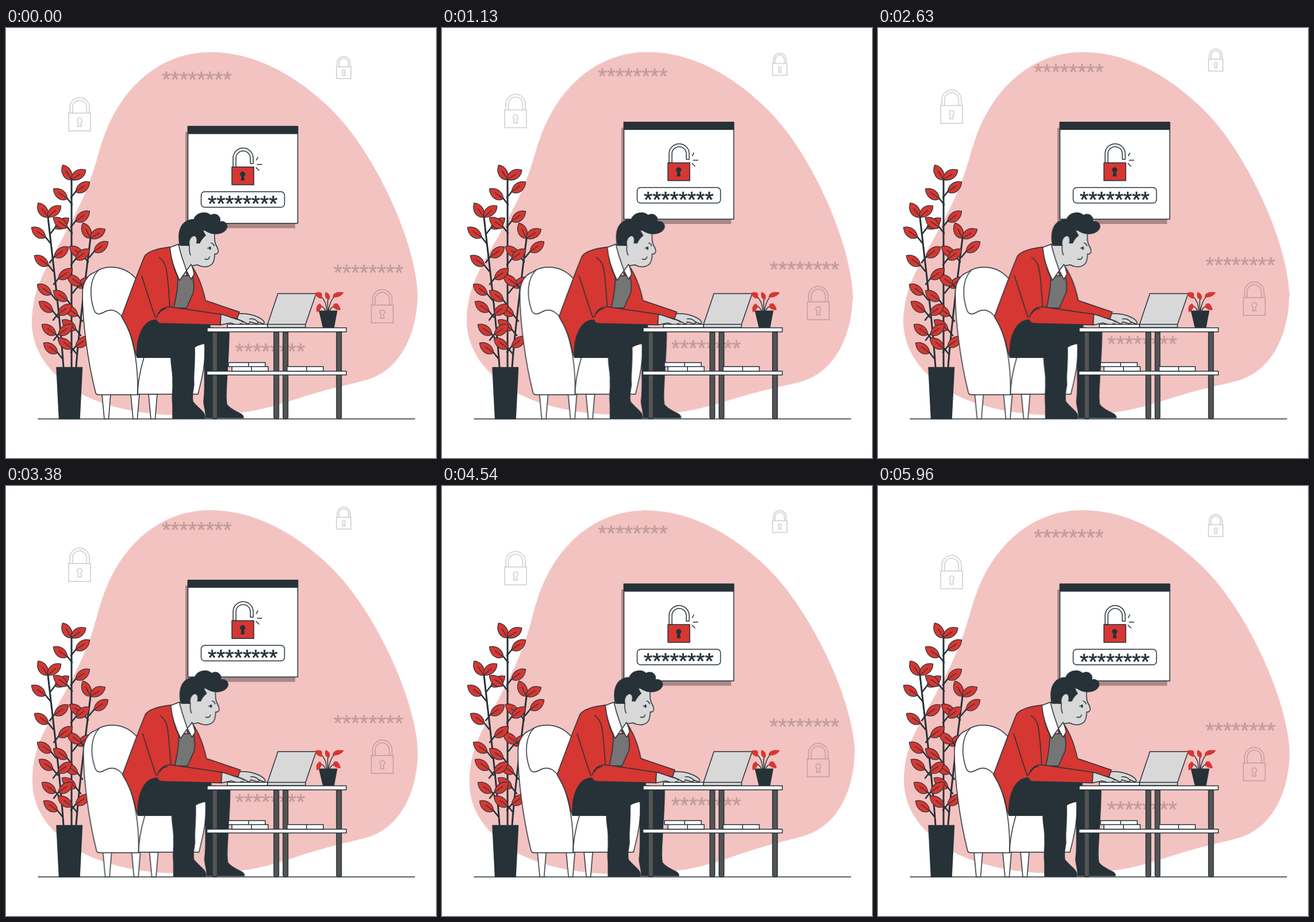
These frames come from a looping animation (748 by 748 pixels, 6 s). An HTML page without scripts:

```html
<!DOCTYPE html>
<html lang="en">
<head>
<meta charset="utf-8">
<title>Password desk</title>
<style>
html, body { margin: 0; width: 100%; height: 100%; overflow: hidden; background: #fff; }
svg { display: block; width: 100vw; height: 100vh; }

.ink { stroke: #263238; stroke-width: 1.5; stroke-linecap: round; stroke-linejoin: round; }
.dark { fill: #263238; }
.red { fill: #d63732; }
.white { fill: #fff; }
.skin { fill: #d8d8d8; }
.line { fill: none; }
.faint { opacity: .2; }
.stars { font: 39px "Liberation Sans", Arial, sans-serif; text-anchor: middle; stroke: #000; stroke-width: .6; }
.stars.dark { stroke: #263238; }
.lock { fill: none; stroke: #000; stroke-width: 1.5; }
#lock path, #key { vector-effect: non-scaling-stroke; }

.blob { fill: #f3c3c1; transform-box: fill-box; transform-origin: center; animation: sway 6s linear infinite; }
.drift { animation: rise 6s linear infinite; }
.card { animation: rise 1.5s linear infinite; }
.man { animation: shake 6s linear infinite; }

@keyframes sway {
  25% { transform: rotate(1deg); }
  75% { transform: rotate(-1deg); }
}
@keyframes rise {
  50% { transform: translateY(-15px); }
}
@keyframes shake {
  10%, 90% { transform: translateX(-1.5px); }
  20%, 80% { transform: translateX(3px); }
  30%, 50%, 70% { transform: translateX(-6px); }
  40%, 60% { transform: translateX(6px); }
}
</style>
</head>
<body>
<svg viewBox="0 0 748 748">
<defs>
  <path id="key" d="M-2 16.300A4.200 4.200 0 1 1 2 16.300L3.200 23H-3.200Z"/>
  <g id="lock">
    <path d="M-19 0H19V31H-19Z"/>
    <path d="M-17 0V-10A17 17 0 0 1 17-10V0M-12.300 0V-10A12.300 12.300 0 0 1 12.300-10V0"/>
    <use href="#key"/>
  </g>
  <g id="leaf" stroke-width="1.200">
    <path class="red" d="M0 0C5-10 20-12 30 1C22 10 8 10 0 0Z"/>
    <path class="line" d="M0 0L18 .5"/>
  </g>
  <g id="l">
    <path class="line" stroke-width="2.600" d="M0 0L8 10"/>
    <use href="#leaf" transform="rotate(-147)"/>
  </g>
  <use id="r" href="#l" transform="scale(-1 1)"/>
  <path id="leg" class="ink" fill="#545454" d="M0 529H8.500V677Q8.500 680 4.300 680Q0 680 0 677Z"/>
  <path id="foot" class="ink white" d="M0 637L4 680H11.500L15 637Z"/>
</defs>

<path class="blob" d="M357 42C265 42 208 105 180 165C168 191 163 212 154 242C135 306 100 360 70 418C50 455 45 485 45 515C46 565 80 607 130 636C190 668 270 676 330 673C410 674 450 663 500 647C550 630 590 622 625 613C690 595 716 525 716 462C713 380 653 240 583 160C522 92 440 42 357 42Z"/>

<g class="drift">
  <g class="faint">
    <g class="lock">
      <use href="#lock" x="128" y="148"/>
      <use href="#lock" x="654.500" y="482"/>
      <use href="#lock" transform="translate(587.500 67.500) scale(.66)"/>
    </g>
    <g class="stars">
      <text x="332" y="102.500">********</text>
      <text x="630.500" y="438.500">********</text>
      <text x="459.500" y="576">********</text>
    </g>
  </g>
</g>

<g class="card">
  <g transform="translate(0 .8)">
    <path opacity=".3" d="M312 180H503V347.500H312Z"/>
    <path class="ink white" d="M316.500 170.500H507.500V339H316.500Z"/>
    <path class="ink dark" d="M316.500 170.500H507.500V183H316.500Z"/>
    <path class="ink white" d="M395 241V225.500A17.500 17.500 0 0 1 430 225.500V235H425V225.500A12.500 12.500 0 0 0 400 225.500V241Z"/>
    <path class="ink red" d="M393 241H431V272H393Z"/>
    <use href="#key" class="dark" transform="translate(411.700 239.500) scale(1.100)"/>
    <path class="ink line" d="M435.500 229L438 224M437 236.700H445M435 242L440 247"/>
    <rect class="ink white" x="339.500" y="284" width="145" height="27" rx="6"/>
    <text class="stars dark" x="411.700" y="318.500">********</text>
  </g>
</g>

<path class="ink" d="M56 680H711"/>

<g class="ink">
  <path class="line" stroke-width="3" d="M114 590V264M100 590C94 500 83 420 73 329M122 590C127 520 139 430 147 366"/>
  <use href="#r" x="85" y="348"/>
  <use href="#l" x="135" y="397"/>
  <use href="#r" x="124" y="451"/>
  <use href="#r" x="121" y="554"/>
  <use href="#l" x="131" y="447"/>
  <use href="#l" x="125" y="500"/>
  <use href="#l" x="122" y="525"/>
  <use href="#leaf" transform="translate(114 264) rotate(-123)"/>
  <use href="#leaf" transform="translate(114 264) rotate(-36)"/>
  <use href="#leaf" transform="translate(73 329) rotate(-127)"/>
  <use href="#leaf" transform="translate(73 329) rotate(-43)"/>
  <use href="#leaf" transform="translate(147 366) rotate(-118)"/>
  <use href="#leaf" transform="translate(147 366) rotate(-34)"/>
  <use href="#r" x="153" y="389"/>
  <use href="#r" x="121" y="285"/>
  <use href="#l" x="107" y="297"/>
  <use href="#r" x="121" y="336"/>
  <use href="#l" x="107" y="347"/>
  <use href="#l" x="69" y="364"/>
  <use href="#r" x="84" y="398"/>
  <use href="#r" x="121" y="402"/>
  <use href="#l" x="74" y="413"/>
  <use href="#r" x="91" y="436"/>
  <use href="#l" x="79" y="463"/>
  <use href="#l" x="107" y="474"/>
  <use href="#l" x="82" y="493"/>
  <use href="#r" x="90" y="498"/>
  <use href="#l" x="87" y="533"/>
  <use href="#r" x="91" y="533"/>
  <use href="#l" x="90" y="565"/>
  <use href="#l" x="115" y="557"/>
  <path class="dark" d="M88 590.500H132.500L128 680H92.500Z"/>
</g>

<g class="man">
  <use href="#foot" x="167"/>
  <use href="#foot" x="217"/>
  <use href="#foot" x="248"/>
  <g class="ink white">
    <path d="M229 573L345 545C349 575 342 605 334 637H229Z"/>
    <path d="M156 635C142 580 133 510 133 462C133 443 141 430 154 425C172 412 204 411 226 436L240 573C232 600 229 620 229 638H162Q157 638 156 635Z"/>
    <path class="line" d="M161 421C145 437 145 466 153 490C157 501 164 498 173 493C190 485 203 500 210 516C224 550 230 590 229 638M229 573H286"/>
  </g>

  <g class="ink dark">
    <path d="M330 520L388 523C388 565 385 590 384 615C383 630 382 642 384 655C391 664 401 667 408 671Q413 674 413 678H347C349 668 344 660 344 648C348 620 343 590 347 550Z"/>
    <path d="M228 573C226 535 240 507 266 507L355 515V548Q340 548 328 555C329 590 325 605 327 620C325 632 323 640 325 650C333 660 340 664 344 670Q347 676 345 679H290L290 655C288 640 291 630 290 615C291 600 287 590 287 573Z"/>
  </g>

  <g class="ink">
    <path class="skin" d="M404 497C415 496 424 498 431 500C440 503 447 507 449.500 512Q449 515 445 514L438 511Q440 515 434 514L424 511Q424 516 416 514L400 507Z"/>
    <path class="red" d="M319 408C332 425 341 445 347 474L406 494L402 506L374 500L300 490Z"/>
    <path fill="#757575" d="M299 432L324 430C327 440 327 452 326 460L314 487H290Z"/>
    <path class="skin" d="M300 377C307 379 314 378 318 374L330 358L350 349L363 356C362 366 363 372 365 377C368 382 370 386 369 390Q367 394 363 393C363 401 362 406 359 410C352 417 342 417 333 412L321 414L314 427L298 398Z"/>
    <path class="white" d="M284 382L300 376C304 395 309 407 314 422L302 439C293 420 287 402 284 382Z"/>
    <path class="white" d="M314 422L322 411C325 418 327 423 327 429L322 437Z"/>
    <path class="red" d="M285 381C268 383 248 387 241 397C228 428 213 470 201 502C214 523 221 545 224 561L228 573C226 535 240 507 262 508Q263 514 271 514L373 516.500L374 498L292 486C297 465 299 450 299 434C291 418 287 400 285 381Z"/>
    <path class="line" d="M266 399C279 408 279 420 281 435C283 455 284 470 285 485L292 486M236 431C244 455 252 483 260 504M285 485Q268 485 262 503M266 497Q270 489 279 488"/>
    <path class="skin" d="M374 498C384 500 391 504 399 506C408 508 415 511 420 515Q414 517 407 514Q410 517 400 516L390 513L373 516.500Z"/>
    <path class="line" d="M399 506Q408 507 412 512M424 506Q432 505 438 511"/>
  </g>

  <path class="ink dark" d="M302 376C298 352 305 334 327 333C331 321 348 318 356 326C367 320 375 330 371 338C379 334 386 341 384 348C379 359 362 360 352 355L341 349C342 354 345 357 347 361C343 364 339 369 337 374L331 374C332 364 326 362 322 367Q319 372 319 378Q310 379 302 376Z"/>
  <path class="skin" d="M320 380C317 370 322 362 328 362Q333 364 331 374L329 382Z"/>
  <path class="ink line" d="M319 378Q318 388 321 395M357 374Q361 375 362 379M346 402Q353 404 354 398M351 383L355 382"/>
  <ellipse class="dark" cx="355" cy="383" rx="1.600" ry="3"/>
</g>

<use href="#leg" x="359"/>
<use href="#leg" x="466"/>
<use href="#leg" x="482"/>
<use href="#leg" x="575"/>
<g class="ink white">
  <path d="M350 521.500H592V528.500H350ZM349.500 597H592V603.500H349.500Z"/>
  <path d="M387 582H451V589H387ZM422 582V589M393 589H456V597H393ZM427 589V597M489 589H552V597H489ZM523 589V597"/>
  <path d="M385 515.500H455V521H385Z"/>
  <path class="skin" d="M455 515.500H521V521H455ZM455 515.500L473 462H539.500L521 515.500Z"/>
</g>

<g>
  <path class="ink line" stroke-width="1" d="M558 492Q557 475 548 467M560 492Q559 480 560 468M561 492Q564 472 574 465M556 492Q552 484 546 483M563 492Q566 484 574 483"/>
  <path class="red" d="M537 461Q549 457 550 464L549 471Q540 470 537 461ZM556 459Q567 464 562 473Q552 470 556 459ZM568 468Q569 457 588 460Q580 471 568 468ZM541 495Q537 484 546 479Q554 485 541 495ZM569 486Q568 478 576 479Q582 485 582 491Q574 491 569 486Z"/>
  <path class="dark" d="M544 491.500H576.500L571 521H551Z"/>
</g>
</svg>
</body>
</html>
```
